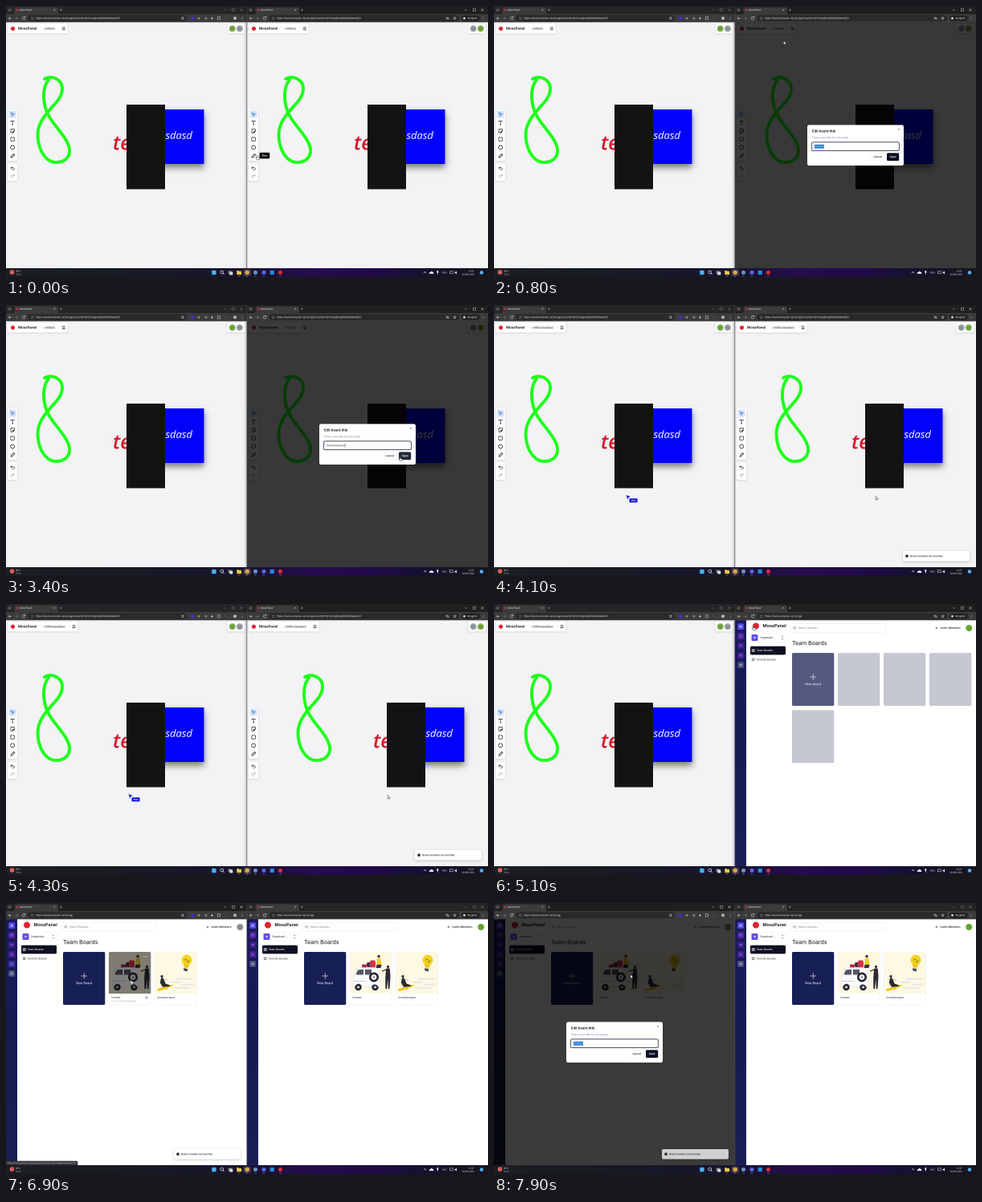
Write an HTML page with a canvas that moves like this. It is 600 by 338 pixels and loops after 8000 ms.

```html
<!DOCTYPE html>
<html lang="en">
<head>
<meta charset="utf-8">
<title>Shared board</title>
<style>
html, body { margin: 0; width: 100%; height: 100%; overflow: hidden; background: #202124; }
canvas { display: block; width: 600px; height: 338px; }
</style>
</head>
<body>
<canvas id="stage"></canvas>
<script>
const W = 600, H = 338, LOOP = 8000, STEP = 100;
const ratio = window.devicePixelRatio || 1;

// The screen is drawn four times larger and scaled down, which keeps tiny text smooth.
const scale = 4 * ratio;
const stage = document.getElementById('stage');
const screen4 = document.createElement('canvas');
stage.width = W * ratio;
stage.height = H * ratio;
screen4.width = W * scale;
screen4.height = H * scale;
const out = stage.getContext('2d');
const g = screen4.getContext('2d');

const BRAND = 'MossPanel';
const HOST = 'https://live-board-plum.vercel.app';
const BOARD_URL = HOST + '/board/j57407zvtrxgfxrqDk2b5yfk68wefyfr';
const NAVY = '#0b1022', PURPLE = '#5f4df2', INK = '#16181d';
const GREEN = '#69a02e', GRAY = '#87909b';

// Moments of the story, in ms
const AT = {
  editOpen: 500, caret: 1500, typing: 2000, saved: 3600, pan: 4000,
  rightHome: 5100, leftFocus: 5600, leftHome: 5800, leftReady: 6100,
  created: 6600, menu: 7300, rename: 7600
};

// Pointer path: time, x, y
const PATH = [
  [0, 312, 187], [100, 344, 95], [200, 354, 29], [700, 354, 29],
  [1200, 417, 176], [2900, 417, 176], [3300, 490, 190], [3600, 490, 190],
  [4000, 475, 239], [4800, 475, 239], [5000, 322, 28], [5200, 322, 28],
  [5500, 22, 28], [5700, 22, 28], [5900, 337, 79],
  [6200, 97, 95], [6500, 97, 95], [6900, 155, 96], [7000, 155, 96],
  [7200, 173, 67], [7350, 173, 67], [7550, 170, 90], [LOOP, 170, 90]
];

const ease = k => k * k * (3 - 2 * k);
const ramp = (t, a, b) => ease(Math.min(1, Math.max(0, (t - a) / (b - a))));

function pointer(t) {
  const i = Math.max(1, PATH.findIndex(p => p[0] >= t));
  const [a, ax, ay] = PATH[i - 1], [b, bx, by] = PATH[i];
  const k = ramp(t, a, b);
  return { x: ax + (bx - ax) * k, y: ay + (by - ay) * k };
}

function box(x, y, w, h, fill, r = 0, stroke, lw = 0.5) {
  g.beginPath();
  g.roundRect(x, y, w, h, r);
  if (fill) { g.fillStyle = fill; g.fill(); }
  if (stroke) { g.strokeStyle = stroke; g.lineWidth = lw; g.stroke(); }
}

function dot(x, y, r, fill, stroke, lw = 0.6) {
  g.beginPath();
  g.arc(x, y, r, 0, Math.PI * 2);
  if (fill) { g.fillStyle = fill; g.fill(); }
  if (stroke) { g.strokeStyle = stroke; g.lineWidth = lw; g.stroke(); }
}

function path(d, fill, stroke, lw = 0.6) {
  const p = new Path2D(d);
  if (fill) { g.fillStyle = fill; g.fill(p); }
  if (stroke) { g.strokeStyle = stroke; g.lineWidth = lw; g.stroke(p); }
}

function text(s, x, y, size, color, weight = 400, align = 'left', family = 'Inter') {
  g.font = `${weight} ${size}px ${family}, sans-serif`;
  g.textAlign = align;
  g.textBaseline = 'middle';
  g.fillStyle = color;
  g.fillText(s, x, y);
}

const ui = (s, x, y, size, color, align = 'left') =>
  text(s, x, y, size, color, 400, align, 'Roboto');

function widthOf(s, font) {
  g.font = font + ', sans-serif';
  return g.measureText(s).width;
}

function shadow(color, blur, dy, draw) {
  g.save();
  g.shadowColor = color;
  g.shadowBlur = blur * scale;
  g.shadowOffsetY = dy * scale;
  draw();
  g.restore();
}

function at(x, y, draw) {
  g.save();
  g.translate(x, y);
  draw();
  g.restore();
}

const panel = (x, y, w, h, r = 2) =>
  shadow('rgba(0,0,0,.16)', 2, 0.6, () => box(x, y, w, h, '#fff', r));

function star(x, y, r, color) {
  g.beginPath();
  for (let i = 0; i < 10; i++) {
    const a = i * Math.PI / 5 - Math.PI / 2, q = i % 2 ? r * 0.48 : r;
    g.lineTo(x + q * Math.cos(a), y + q * Math.sin(a));
  }
  g.closePath();
  g.strokeStyle = color;
  g.lineWidth = 0.45;
  g.stroke();
}

// Browser frame, local to one window
function chrome(active, url, secret) {
  const ctl = active ? '#f2f2f2' : '#8b8b8b';
  box(0, 0, 300, 10.5, active ? '#1f1f20' : '#252527');
  box(1.5, 2, 6, 6, '#333335', 1.5);
  path('M3.4 4.5l1.1 1.1 1.1-1.1', null, '#ddd', 0.5);
  box(10.5, 1.5, 54.5, 10, '#3b3b3c', [2.5, 2.5, 0, 0]);
  dot(14, 5, 1.3, '#d92b35');
  ui(BRAND, 17, 5, 3.1, '#e4e4e4');
  path('M59.3 3.8l2 2m0-2l-2 2M67 5h3M68.5 3.5v3', null, '#ccc', 0.4);
  path('M271 5h3M281.5 3.5h3v3h-3zM291.5 3.5l3 3m0-3l-3 3', null, ctl, 0.4);

  box(0, 10, 300, 10.3, '#3b3b3c');
  path('M7 15.3H3.4m1.5-1.5l-1.5 1.5 1.5 1.5', null, '#ddd', 0.5);
  path('M11 15.3h3.6m-1.5-1.5l1.5 1.5-1.5 1.5', null, '#858585', 0.5);
  path('M23.6 14.2a1.8 1.8 0 1 0 .2 1.8M23.9 12.9v1.5h-1.5', null, '#ddd', 0.5);
  box(27, 11.4, secret ? 237 : 198, 7.7, '#29292a', 3.8);
  path('M31 14.3h3.4M31 16.3h3.4', null, '#ccc', 0.4);
  ui(url, 37, 15.4, 3.1, '#e6e6e6');
  if (secret) {
    path('M247.5 15.3q2-2.2 4 0q-2 2.2-4 0m.3-2l3.6 4', null, '#ccc', 0.45);
    star(258.5, 15.3, 1.8, '#ccc');
    box(267, 11.8, 23, 7, '#222224', 3.5);
    dot(270.5, 15.3, 1.4, '#ddd');
    ui('Incognito', 274, 15.4, 3, '#eee');
  } else {
    star(220, 15.3, 1.8, '#ccc');
    box(230.5, 13.5, 4, 4, '#3b33c4', 1);
    dot(240, 15.3, 1.4, '#8d8d8d');
    box(247.4, 13.8, 3, 3, '#777', 0.8);
    path('M256.5 13.5v3.6M255 15.3h3', null, '#ddd', 0.6);
    box(263.2, 13.6, 3.4, 3.4, null, 0.5, '#ddd');
    path('M273.3 13.2v4.2', null, '#777', 0.4);
    dot(285, 15.3, 2, '#b9b9b9');
  }
  for (const d of [-1.3, 0, 1.3]) dot(294, 15.3 + d, 0.35, '#ddd');
}

function drawing() {
  g.lineCap = 'round';
  path('M48 91C54 87.5 62 88.5 67.5 95C72 101 70 110 65 117C56 129 40 141 39.5 160C39.5 180 50 195 62 195C75 195 81 186 78.5 176C74 160 56 147 50 130C46 118 45 102 53 92',
    null, '#1dff1b', 3.9);
  g.lineCap = 'butt';
  text('text', 133, 172.7, 25, '#d8182c', 'italic 600', 'left', '"Open Sans"');
  shadow('rgba(0,0,0,.5)', 8, 4.5, () => box(177.5, 129, 69, 68, '#0202fb'));
  text('asdasd', 211.5, 162.3, 13, '#fff', 'italic 400', 'center', '"Open Sans"');
  box(150, 123, 48, 105.5, '#131215');
}

function tools() {
  panel(2, 129, 12, 64);
  box(3.3, 130.3, 9.4, 9.4, '#d9e6fb', 1.5);
  path('M6.2 133l4.2 1.7-1.8.7-.8 1.8z', null, '#2563b8', 0.6);
  path('M6 144.3v-.9h4.2v.9M8.1 143.4v4.6M7.2 148h1.8', null, INK, 0.7);
  path('M6 153.6h4.4v2.8l-1.8 1.8H6zM10.4 156.2H8.5v2', null, INK, 0.7);
  box(5.9, 163.9, 4.4, 4.4, null, 0.5, INK, 0.7);
  dot(8.1, 176.4, 2.4, null, INK, 0.7);
  path('M6 189.2l.5-1.8 3-3 1.3 1.3-3 3z', null, INK, 0.7);
  panel(2, 196.5, 12, 21.5);
  path('M7.4 200.4l-1.5 1.4 1.5 1.4M6 201.8h2.9a1.4 1.4 0 0 1 0 2.8H7.6', null, INK, 0.6);
  path('M8.8 210l1.5 1.4-1.5 1.4M10.2 211.4H7.3a1.4 1.4 0 0 0 0 2.8h1.3', null, '#a5a5a8', 0.6);
}

function board(title, pan, people) {
  box(0, 20, 300, 307, '#f3f2f4');
  at(pan, 0, drawing);
  const w = widthOf(title, '400 3.75px Inter');
  panel(2, 22, w + 61, 12.3);
  dot(8.5, 28.2, 2.6, '#dc2633');
  text(BRAND, 15, 28.3, 4.4, '#111', 600);
  text('|', 42.5, 28, 4, '#ddd');
  text(title, 47, 28.3, 3.75, '#222');
  const m = 47 + w + 9;
  text('|', m - 5, 28, 4, '#ddd');
  path(`M${m} 26.6h4M${m} 28.2h4M${m} 29.8h4`, null, '#111', 0.6);
  panel(275.5, 22, 22, 12.3);
  people.forEach((c, i) => {
    dot(281.7 + i * 9.2, 28.2, 4, c);
    dot(281.7 + i * 9.2, 28.2, 3.2, null, '#c4cdbd', 0.5);
  });
  tools();
}

function bulbArt() {
  box(0, 0, 52, 52, '#fdf9e3');
  for (const [x, y, w] of [[27, 33, 22], [21, 37, 12], [34, 40, 15], [24, 44, 20]])
    box(x, y, w, 1.5, '#e4e3e8', 0.8);
  dot(40, 10.2, 6.5, '#f5d51f');
  path('M35.7 14l7.5 2-1.7 4.5-5-1.2z', '#f0cb1c');
  path('M36.3 20l5 1.3-.8 3.2-4.2-1.1z', '#4a4856');
  path('M37 11q2.2-5 3.2 0t3-1', null, '#6b5a23', 0.6);
  path('M4 46l17-5 3 1.2-18 6.5q-3 .3-2-2.7z', '#f3c91c');
  path('M3 47.5q8-1 13-1.5', null, '#e4b91d', 1);
  dot(9, 30.5, 1.6, '#2b2935');
  path('M8 32.3l3 .4 2.5 6.8 5.5 2-.3 1.5-8.7.8-3.2-5.3z', '#2b2935');
  path('M11 34l5 1', null, '#e4a78c', 0.8);
}

function carArt() {
  box(0, 0, 52, 52, '#fdf9e3');
  box(21, 13, 5.5, 6, '#3a3848', 1.5);
  box(25, 10.5, 7, 9, '#d8344a', 2);
  box(15, 15.5, 6, 4, '#b52b45', 1.2);
  for (const x of [10.5, 31.5]) { dot(x, 44, 4.2, '#282833'); dot(x, 44, 1.6, '#c9cad2'); }
  path('M6 26q1-6.5 7-6.5h17q6 0 7 7v16.5h-2a4.4 4.4 0 0 0-8 0H15a4.4 4.4 0 0 0-8.5 0H4.5V31z', '#fafafc', '#d4d5dd', 0.4);
  path('M8 27q1-5 5-5h4v6.5H8zM19 22h8v6.5h-8z', '#555766');
  dot(30, 31.5, 6, '#282833');
  dot(30, 31.5, 3.4, '#f1f1f5');
  dot(30, 31.5, 1, '#555766');
  path('M5 36.5h16', null, '#bfc0ca', 0.7);
  dot(36, 5.5, 1.7, '#30283a');
  path('M33.8 7.8h4.5l1.2 8h-6z', '#f4cd22');
  path('M33.5 15.8h6l-1 4.2h-6z', '#30313f');
  dot(47.5, 18.5, 1.6, '#30283a');
  path('M45.3 20.5h4.4l.8 10.5-1 15h-1.7l-.4-12-1.3 12h-1.7l-.2-14.5z', '#2a2935');
  path('M46 22l-6 2', null, '#2a2935', 1.2);
}

function card(x, { title, art, hover, menuShown }) {
  at(x, 61, () => {
    box(0, 0, 52.3, 66, '#fff', 1.5, '#e3e3e8', 0.4);
    g.save();
    g.beginPath();
    g.roundRect(0, 0, 52.3, 52, [1.5, 1.5, 0, 0]);
    g.clip();
    art();
    if (hover) box(0, 0, 52.3, 52, 'rgba(0,0,0,.5)');
    g.restore();
    text(title, 3, 57, 3.1, '#333');
    if (hover) {
      text('You, less than a minute ago', 3, 61.6, 2.4, '#999');
      star(47, 57, 1.8, '#777');
    }
    if (hover || menuShown) for (const d of [0, 1.8, 3.6]) dot(43.5 + d, 6, 0.5, '#fff');
  });
}

function home({ orgs, avatar, loading, cards }) {
  box(0, 20, 300, 307, '#fff');
  const grad = g.createLinearGradient(0, 20, 14, 327);
  grad.addColorStop(0, '#1a1b5c');
  grad.addColorStop(0.5, '#141c50');
  grad.addColorStop(1, '#192154');
  box(0, 20, 14, 307, grad);
  const tones = [PURPLE, '#5728a8', '#4a1d92', '#4c239c', '#4135ac'];
  for (let i = 0; i < orgs; i++) {
    box(3.3, 24.3 + i * 12, 7.6, 7.6, tones[i], 1.3);
    dot(7.1, 28.1 + i * 12, 1.2, i ? '#8060c0' : '#d4cfff');
  }
  const py = 28 + orgs * 12;
  box(3.3, py - 3.8, 7.6, 7.6, '#50557c', 1.3);
  path(`M5.3 ${py}h3.6M7.1 ${py - 1.8}v3.6`, null, '#d5d7e5', 0.6);

  dot(26, 27.5, 4, '#dc2633');
  text(BRAND, 34.5, 27.3, 5.5, '#111', 600);
  box(18.5, 36.5, 44.5, 11, '#fff', 1.5, '#eeeef1', 0.4);
  box(20.5, 38, 8, 8, PURPLE, 1.3);
  dot(24.5, 42, 1.2, '#d4cfff');
  text('Organizati...', 31, 42, 3.3, '#333');
  path('M57.8 41l1.2-1.3 1.2 1.3M57.8 43l1.2 1.3 1.2-1.3', null, '#777', 0.5);
  box(19, 52.7, 44, 10.7, NAVY, 1.5);
  for (const [x, y] of [[21, 56.3], [23, 56.3], [21, 58.3], [23, 58.3]])
    box(x, y, 1.5, 1.5, null, 0, '#fff', 0.35);
  text('Team Boards', 26.5, 58.1, 3.3, '#fff');
  star(22.7, 69.3, 1.9, '#333');
  text('Favorite Boards', 26.5, 69.5, 3.3, '#333');

  box(69, 24.7, 118.5, 10.4, '#fff', 1.5, '#e3e4e9', 0.4);
  dot(74, 29.5, 1.4, null, '#777', 0.5);
  path('M75.1 30.6l1.1 1.1', null, '#777', 0.5);
  text('Search Boards...', 78.5, 30, 3.4, '#858891');
  path('M249.5 30h3M251 28.5v3', null, '#222', 0.5);
  text('Invite Members', 255.5, 30.1, 3.4, '#222', 500);
  dot(291.3, 30, 4, avatar);
  text('Team Boards', 71, 49.2, 7, '#111');

  box(71, 61, 52.3, 66, loading ? '#54597f' : '#172055', 1.5);
  path('M93.5 91h7.4M97.2 87.3v7.4', null, '#fff', 0.6);
  text('New Board', 97.2, 100, 3.8, '#fff', 400, 'center');
  if (loading) {
    for (let i = 1; i < 5; i++)
      box(71 + (i % 4) * 57, 61 + Math.floor(i / 4) * 71.3, 52.3, 66, '#c5c7d1', 1.5);
  } else {
    cards.forEach((c, i) => card(128 + i * 57, c));
  }
}

// The dialog fades in while growing to full size; k is its progress
function dialog(value, { k, selected, hoverSave }) {
  g.save();
  g.globalAlpha = k;
  box(0, 20, 300, 307, 'rgba(0,0,0,.77)');
  const size = 0.95 + 0.05 * k;
  g.translate(150, 173.7);
  g.scale(size, size);
  g.translate(-150, -173.7);
  box(90, 148.4, 120, 50.6, '#fff', 2.2);
  text('Edit board title', 96, 156.3, 4.2, '#111', 600);
  path('M203 152.9l2 2m0-2l-2 2', null, '#666', 0.4);
  text('Enter a new title for this board', 96, 164.3, 3.2, '#777c88');
  box(95.3, 169.8, 109.4, 10.8, '#fff', 2, '#1b1e34', 0.75);
  box(96.3, 170.8, 107.4, 8.8, null, 1.4, '#dfe1e7', 0.3);
  const w = widthOf(value, '400 3.2px Inter');
  if (selected) box(98.8, 172.8, w + 0.5, 4.8, '#1a73d9');
  text(value, 99, 175.3, 3.2, selected ? '#fff' : '#333');
  if (!selected) box(99.3 + w, 173, 0.4, 4.5, '#111');
  box(168.5, 183.3, 18.5, 9.8, '#fff', 1.5, '#e8e9ed', 0.4);
  text('Cancel', 177.7, 188.3, 3.3, '#222', 500, 'center');
  box(189, 183.3, 15.2, 9.8, hoverSave ? '#252a3b' : NAVY, 1.5);
  text('Save', 196.6, 188.3, 3.3, '#fff', 600, 'center');
  g.restore();
}

function toast(message, k, dim) {
  if (k <= 0) return;
  g.save();
  g.globalAlpha = k;
  g.translate(0, (1 - k) * 12);
  shadow('rgba(0,0,0,.2)', 3, 1, () => box(209, 307, 83, 12.5, dim ? '#d0d0d2' : '#fff', 2));
  dot(214, 313.2, 1.8, '#111');
  box(213.75, 312.7, 0.5, 1.6, '#fff');
  text(message, 218, 313.3, 3, '#222', 500);
  g.restore();
}

function status(s) {
  box(0, 321.7, widthOf(s, '400 2.7px Roboto') + 4, 5.3, '#333336', [0, 1.5, 0, 0]);
  ui(s, 1.5, 324.5, 2.7, '#d5d5d5');
}

function menu() {
  panel(148, 71.5, 36, 36);
  box(149, 84.2, 34, 10.5, '#f0f1f4', 1);
  ['Copy board link', 'Rename', 'Delete'].forEach((s, i) =>
    text(s, 153, 78 + i * 11.5, 3.2, '#222'));
}

function taskbar() {
  const grad = g.createLinearGradient(0, 0, W, 0);
  [[0, '#1b1f24'], [0.2, '#171c22'], [0.5, '#181430'], [0.64, '#260c4e'], [0.76, '#210a48'], [0.87, '#141230'], [1, '#17171d']]
    .forEach(([p, c]) => grad.addColorStop(p, c));
  box(0, 327, W, 11, grad);
  dot(7.5, 332, 2.8, '#d9685c');
  dot(9.2, 330.6, 1.3, '#dc3838');
  ui('30°C', 12, 331, 2.8, '#eee');
  ui('Sunny', 12, 334.8, 2.5, '#aaa');
  box(256.2, 329.8, 5.4, 5.4, '#42b4f2', 0.5);
  dot(268.8, 332, 1.9, null, '#eee', 0.7);
  path('M270.2 333.4l1.4 1.5', null, '#eee', 0.7);
  box(276.6, 330.3, 4, 4, '#777', 0.5);
  box(278.3, 331.5, 4, 4, '#ddd', 0.5);
  path('M287.3 330h2l.8.8h3v4.3h-5.8z', '#f5c745');
  box(295.5, 328.3, 9.4, 8.4, '#3b3751', 1.5);
  dot(300.2, 332.4, 2.8, '#e2a340');
  dot(310.5, 332.4, 2.6, '#6c93bd');
  dot(321, 332.4, 2.6, '#5865e9');
  box(328.6, 329.8, 5.2, 5.2, '#278bd4', 0.8);
  dot(341.5, 332.4, 2.6, '#d92b35');
  for (const x of [290, 300, 310.5, 321, 341.5]) box(x - 1.2, 336.6, 2.4, 0.6, '#9aa', 0.3);
  path('M520 333l1.5-1.5 1.5 1.5', null, '#eee', 0.6);
  path('M527 334h5q1-1.7-.8-2-1.3-2.3-3 0-2 .1-1.2 2z', '#eee');
  box(536.4, 330, 1.8, 3.2, '#eee', 0.9);
  path('M537.3 333v2', null, '#eee', 0.5);
  ui('ENG', 543, 332.6, 2.9, '#eee');
  box(552.4, 330.8, 4, 3, null, 0.3, '#eee');
  path('M558.7 331.7h1l1.3-1.2v4l-1.3-1.2h-1z', '#eee');
  ui('13:47', 582.5, 331, 2.8, '#eee', 'right');
  ui('20/05/2024', 582.5, 335, 2.8, '#eee', 'right');
  dot(592, 332.5, 2.3, '#58aeea');
}

function remoteCursor(x, y) {
  path(`M${x} ${y - 1.5}l4 1.6-1.8.7-.8 1.8z`, '#1515d8', '#1515d8', 0.6);
  box(x + 3.5, y + 2.3, 10, 5, '#0a0adc', 1);
  text('okay', x + 8.5, y + 4.9, 2.8, '#fff', 600, 'center');
}

function cursor(x, y, kind) {
  at(x, y, () => {
    if (kind === 'beam') path('M-1-2.5h2M0-2.5v5M-1 2.5h2', null, '#111', 0.5);
    else if (kind === 'hand')
      path('M0-.2q.7-.5.9.3v1.5l2 .5q.6.2.5.9l-.3 1.8H.6L-1 2.7q.1-.8 1 0z', '#fff', '#111', 0.35);
    else path('M0-.7v4.6l1.1-1 .7 1.6.7-.3-.7-1.5h1.5z', '#fff', '#222', 0.35);
  });
}

function cursorKind(t, p) {
  if (t > AT.editOpen && t < AT.saved && p.y > 170 && p.y < 181 && p.x > 396) return 'beam';
  const clickable = [[0, 50], [200, 600], [3200, 3650], [4950, 5250], [5450, 5750], [6150, 7600]];
  return clickable.some(([a, b]) => t >= a && t < b) ? 'hand' : 'arrow';
}

function inWindow(x, draw) {
  g.save();
  g.beginPath();
  g.rect(x, 0, 300, 327);
  g.clip();
  g.translate(x, 0);
  draw();
  g.restore();
}

function render(t) {
  g.setTransform(scale, 0, 0, scale, 0, 0);
  const p = pointer(t);
  const leftActive = t >= AT.leftFocus;
  const renamed = 'Untitledasdasd';
  const title = t >= AT.saved ? renamed : 'Untitled';
  const old = { title: renamed, art: bulbArt };
  const fresh = { title: 'Untitled', art: carArt };
  const made = t >= AT.created;
  const editing = t >= AT.editOpen && t < AT.saved;
  const renaming = t >= AT.rename;
  const pan = 24 * ramp(t, AT.pan, 4200);

  inWindow(0, () => {
    const onBoard = t < AT.leftHome;
    if (onBoard) {
      board(title, 0, [GREEN, GRAY]);
      const onCanvas = p.x > 316 && p.y > 36;
      if (onCanvas && !editing && t < AT.rightHome) remoteCursor(p.x - 298 - pan, p.y);
    } else {
      const hover = t >= 6800 && !renaming;
      home({
        orgs: 5, avatar: GRAY, loading: t < AT.leftReady,
        cards: made ? [{ ...fresh, hover, menuShown: renaming }, old] : [old]
      });
    }
    if (t >= AT.menu && !renaming) menu();
    if (renaming) dialog('Untitled', { k: ramp(t, AT.rename - STEP, 7800), selected: true });
    if (made) toast('Board created successfully', ramp(t, AT.created - STEP, 6800), renaming);
    if (t >= AT.leftHome && t < 6000) status(HOST);
    if (t >= 6800 && t < AT.menu) status(HOST + '/board/j57c1hqmx0dp5y7rgn8k2wvt9');
    chrome(leftActive, onBoard ? BOARD_URL : HOST, false);
  });

  inWindow(300, () => {
    const onBoard = t < AT.rightHome;
    if (onBoard) {
      board(title, pan, [GRAY, GREEN]);
      if (t < STEP) {
        box(15.5, 182.8, 12.8, 7.6, '#111', 1.3);
        text('Pen', 21.9, 186.8, 3.2, '#fff', 600, 'center');
      }
      if (editing) {
        const n = Math.max(0, Math.floor((t - AT.typing) / 130));
        dialog(renamed.slice(0, 8 + n), {
          k: ramp(t, AT.editOpen - STEP, 700),
          selected: t < AT.caret,
          hoverSave: p.y > 183 && p.x > 488
        });
      }
      if (t >= AT.saved) toast('Board renamed successfully', ramp(t, AT.saved, 3900));
    } else {
      home({
        orgs: 4, avatar: '#63a82d', loading: t < AT.rightHome + 300,
        cards: made ? [fresh, old] : [old]
      });
    }
    chrome(!leftActive, onBoard ? BOARD_URL : HOST, true);
  });

  const edge = g.createLinearGradient(296, 0, 300, 0);
  edge.addColorStop(0, 'rgba(0,0,0,0)');
  edge.addColorStop(1, 'rgba(0,0,0,.18)');
  if (!leftActive) box(296, 0, 4, 327, edge);
  box(299.5, 0, 0.7, 327, '#4b4b4e');
  taskbar();
  cursor(p.x, p.y, cursorKind(t, p));

  out.imageSmoothingQuality = 'high';
  out.drawImage(screen4, 0, 0, stage.width, stage.height);
}

const start = performance.now();
let shown = -1;
function tick() {
  const t = Math.floor((performance.now() - start) % LOOP / STEP) * STEP;
  if (t !== shown) render(shown = t);
  requestAnimationFrame(tick);
}
tick();
</script>
</body>
</html>
```
